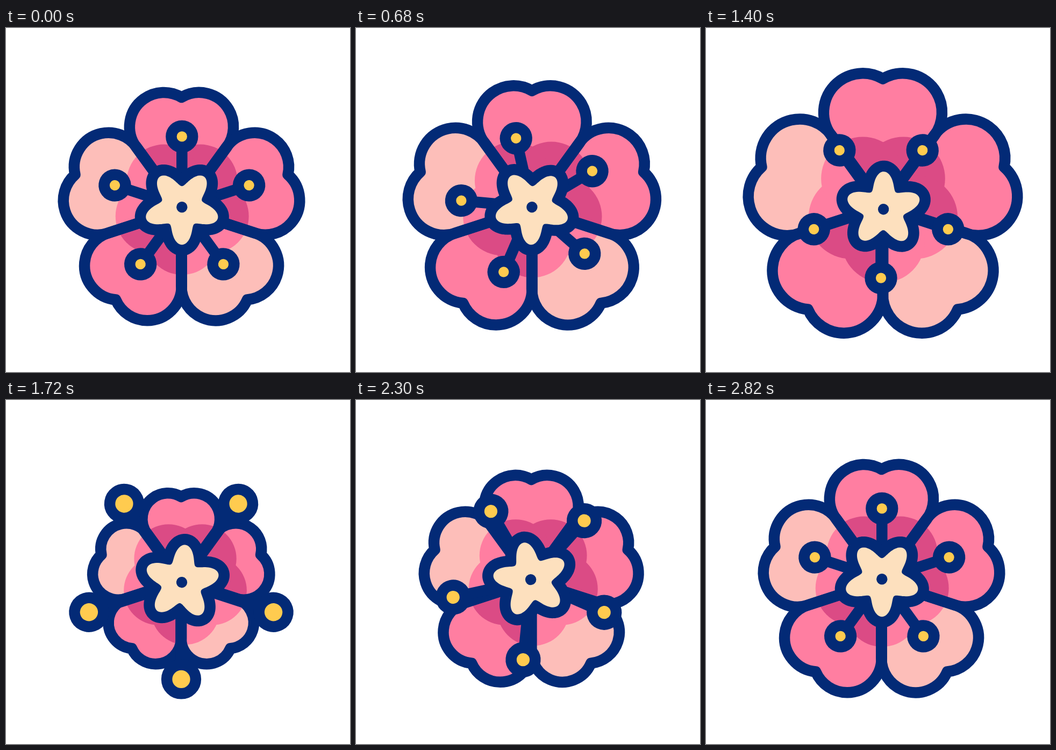
Recreate the animation shown at these times as an HTML page with a canvas. Size 640x640 px, loop 3020 ms.

```html
<!DOCTYPE html>
<html lang="en">
<head>
<meta charset="utf-8">
<title>Blossom</title>
<style>
  html, body { margin: 0; width: 100%; height: 100%; overflow: hidden; background: #fff; }
  canvas { display: block; width: 100vw; height: 100vh; }
</style>
</head>
<body>
<canvas id="stage" width="640" height="640"></canvas>
<script>
const ctx = document.getElementById('stage').getContext('2d');
const LOOP = 3020, STROKE = 20.5, TAU = Math.PI * 2, FIFTH = TAU / 5;
const NAVY = '#032a76', PINK = '#ff7ea1', PEACH = '#fdbeb9', ROSE = '#db4b85';
const YELLOW = '#ffcb4f', CREAM = '#fde0be';
const PETALS = [PINK, PINK, PEACH, PINK, PEACH];
const PIVOT = [327.3, 336.2];

// Eased progress from 0 to 1 between two times
function ease(t, from, to) {
  const u = Math.min(1, Math.max(0, (t - from) / (to - from)));
  return u * u * (3 - 2 * u);
}

// Draws at (x, y), turned by angle
function place(x, y, angle, draw) {
  ctx.save();
  ctx.translate(x, y);
  ctx.rotate(angle);
  draw();
  ctx.restore();
}

function disc(x, y, r) {
  ctx.beginPath();
  ctx.arc(x, y, r, 0, TAU);
}

// Heart-shaped petal: two lobes tangent to the seams of its sector
function petalPath(s) {
  const x = 32.7 * s, y = -153.3 * s, r = 63.9 * s, notch = Math.acos(x / r);
  const path = new Path2D();
  path.moveTo(0, 0);
  path.arc(-x, y, r, 0.8 * Math.PI, -notch);
  path.arc(x, y, r, Math.PI + notch, 0.2 * Math.PI);
  path.closePath();
  return path;
}

function drawPetals(x, y, scale, shadeX, shadeY, shadeR) {
  const petal = petalPath(scale);
  PETALS.forEach((color, i) => place(x, y, i * FIFTH, () => {
    ctx.fillStyle = color;
    ctx.fill(petal);
    ctx.clip(petal);
    ctx.rotate(-i * FIFTH);
    ctx.translate(shadeX - x, shadeY - y);
    ctx.fillStyle = color === PINK ? ROSE : PINK;
    for (let k = 0; k < 5; k++) {
      const a = (k + 0.5) * FIFTH, d = shadeR * 0.827;
      disc(d * Math.sin(a), -d * Math.cos(a), shadeR);
      ctx.fill();
    }
  }));
  PETALS.forEach((_, i) => place(x, y, i * FIFTH, () => ctx.stroke(petal)));
}

function drawStamens(offsetX, offsetY, angle, length, r) {
  place(...PIVOT, angle, () => {
    ctx.translate(offsetX, offsetY);
    ctx.fillStyle = YELLOW;
    for (let i = 0; i < 5; i++) {
      ctx.beginPath();
      ctx.moveTo(0, 0);
      ctx.lineTo(0, -length);
      ctx.stroke();
      disc(0, -length, r);
      ctx.fill();
      ctx.stroke();
      ctx.rotate(FIFTH);
    }
  });
}

function drawStar(angle) {
  place(...PIVOT, angle, () => {
    ctx.translate(0, -3);
    ctx.beginPath();
    for (let i = 0; i < 200; i++) {
      const a = i / 200 * TAU, r = 54.5 + 15.5 * Math.cos(5 * a);
      ctx.lineTo(r * Math.sin(a), r * Math.cos(a));
    }
    ctx.closePath();
    ctx.lineWidth = STROKE * 2;
    ctx.stroke();
    ctx.fillStyle = CREAM;
    ctx.fill();
    ctx.fillStyle = NAVY;
    disc(0, 0, 10.2);
    ctx.fill();
  });
}

function render(t) {
  const open = ease(t, 200, 1400), close = ease(t, 1400, 1800), settle = ease(t, 1800, 2600);
  const pose = (rest, wide, tight) =>
    rest + (wide - rest) * open + (tight - wide) * close + (rest - tight) * settle;

  ctx.fillStyle = '#fff';
  ctx.fillRect(0, 0, 640, 640);
  ctx.strokeStyle = NAVY;
  ctx.lineWidth = STROKE;
  ctx.lineJoin = 'round';

  drawPetals(
    pose(326.5, 329, 325.4), pose(337.1, 331.7, 336.5), pose(1, 1.139, 0.705),
    pose(327.7, 329.5, 334), pose(332.4, 332, 338.8), pose(69.4, 77.6, 62.5));
  drawStamens(
    pose(0, 0, -3), pose(-3, -3, 2), (ease(t, 2200, 2600) - open) * FIFTH / 2,
    pose(131.3, 131.3, 186), pose(19.9, 19.9, 27.7));
  drawStar(ease(t, 600, 2800) * TAU);
}

function tick() {
  render(performance.now() % LOOP);
  requestAnimationFrame(tick);
}
tick();
</script>
</body>
</html>
```
